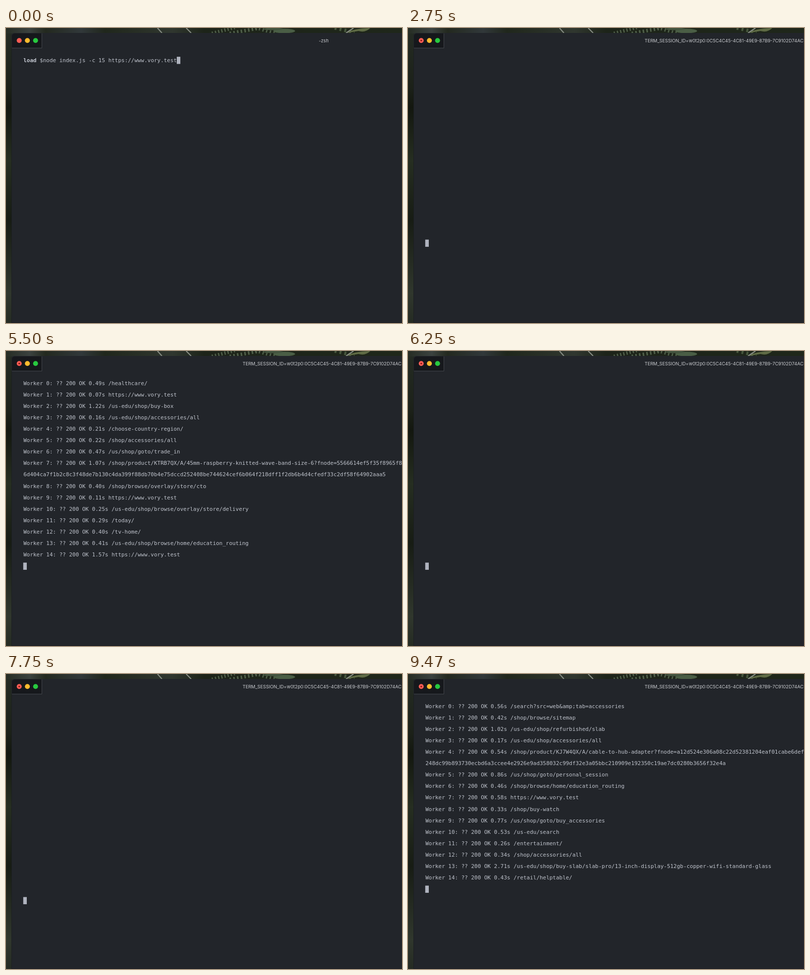
These frames come from a looping animation (800x596 px, 9.94 s). An HTML page:

```html
<!DOCTYPE html>
<html lang="en">
<head>
<meta charset="utf-8">
<title>Load test terminal</title>
<style>
  html, body { margin: 0; width: 100%; height: 100%; overflow: hidden; background: #22252a; }
  #stage { position: relative; width: 800px; height: 596px; overflow: hidden; }
  svg, pre, .title { position: absolute; }
  svg { left: 0; top: 0; }
  pre {
    left: 35.2px; top: 53.7px; margin: 0; color: #bfc3cc;
    font: 10.96px/23.09px "DejaVu Sans Mono", monospace;
  }
  pre b { color: #c6cad3; }
  .title { top: 18px; color: #c9cbcf; font: 9.2px/15px Inter, sans-serif; white-space: nowrap; }
  #idleTitle { left: 632px; }
  #busyTitle { left: 478px; }
</style>
</head>
<body>
<div id="stage">
  <svg width="800" height="596">
    <defs>
      <linearGradient id="foliage" x2="0" y2="1">
        <stop offset="0" stop-color="#252c24"/>
        <stop offset=".2" stop-color="#1c2119"/>
        <stop offset=".27" stop-color="#13170f"/>
        <stop offset=".45" stop-color="#262e21"/>
        <stop offset=".65" stop-color="#171c14"/>
        <stop offset=".9" stop-color="#30372d"/>
        <stop offset="1" stop-color="#252b23"/>
      </linearGradient>
      <linearGradient id="canopy">
        <stop offset="0" stop-color="#262d24"/>
        <stop offset=".06" stop-color="#3b423f"/>
        <stop offset=".1" stop-color="#23291f"/>
        <stop offset=".19" stop-color="#31383a"/>
        <stop offset=".25" stop-color="#20271c"/>
        <stop offset=".42" stop-color="#30372f"/>
        <stop offset=".5" stop-color="#1d2419"/>
        <stop offset="1" stop-color="#1f271a"/>
      </linearGradient>
    </defs>
    <rect width="800" height="596" fill="url(#foliage)"/>
    <rect width="800" height="11" fill="url(#canopy)"/>
    <g fill="none" stroke="#50604a" stroke-width="7">
      <path d="M416 11L462 -1" stroke-dasharray="2.5 4"/>
      <path d="M452 11L512 0" stroke-dasharray="3 4.5"/>
      <path d="M504 -1L544 11" stroke-dasharray="2.5 5"/>
      <path d="M664 0L704 9" stroke="#46563d" stroke-dasharray="4 6"/>
    </g>
    <ellipse cx="562" cy="6" rx="22" ry="4.5" fill="#4a5e45"/>
    <ellipse cx="540" cy="2" rx="20" ry="2.5" fill="#43543f"/>
    <path d="M688 10Q700 1 736 0Q726 10 712 6Z" fill="#5f6b45"/>
    <path d="M306 0l9 10M364 0l10 10M702 0l-15 10" stroke="#858b82" stroke-width="2.2"/>
    <path d="M11 596V16q0-6 6-6H800V596z" fill="#22252a"/>
    <path d="M12 40V17q0-6 6-6H72V40z" fill="#16181c"/>
    <path d="M12 40.5H72.5V11" fill="none" stroke="#43464b"/>
    <path d="M11.5 41V596" stroke="#1b1e21"/>
    <path d="M11 595.5H800" stroke="#191b1f"/>
    <circle cx="26.7" cy="25.3" r="5" fill="#fe5d55"/>
    <circle id="busyMark" cx="26.7" cy="25.3" r="1.6" fill="#80140f"/>
    <circle cx="43.2" cy="25.3" r="5" fill="#febb2e"/>
    <circle cx="59.7" cy="25.3" r="5" fill="#27c83f"/>
    <rect id="cursor" width="7.2" height="14.5" fill="#afb3be"/>
  </svg>
  <div class="title" id="idleTitle">-zsh</div>
  <div class="title" id="busyTitle">TERM_SESSION_ID=w0t2p0:0C5C4C45-4C81-49E9-87B9-7C9102D74AC</div>
  <pre id="prompt"><b>load</b> $node index.js -c 15 https://www.vory.test</pre>
  <pre id="output"></pre>
</div>
<script>
const LOOP = 9940, TICK = 250, ROW = 23.09, CHAR = 6.6;
const RUN = 1250, CLEAR = 1500, FIRST = 1750, LAST = 9470;
const site = 'https://www.vory.test';

// One batch: a line per worker; a newline inside a line is a terminal wrap.
const batch = (start, ...results) => ({
  start,
  text: results.map((r, i) =>
    `Worker ${i}: ?? ${r.startsWith('404') ? '' : '200 OK '}${r}`).join('\n')
});

const missing = '404 Not Found undefined QueryError: Request failed with status code 404';

const batches = [
  batch(FIRST,
    `0.42s ${site}`, `0.40s ${site}`, `0.43s ${site}`, `0.41s ${site}`, `0.44s ${site}`,
    `0.40s ${site}`, `0.45s ${site}`, `0.42s ${site}`, `0.41s ${site}`, `0.43s ${site}`,
    `0.44s ${site}`, `0.42s ${site}`, '0.46s /us-edu/shop/accessories/all',
    '0.52s /us-edu/shop/browse/overlay/store/delivery/times',
    '0.58s /us-edu/shop/browse/home/education_routing/store/pickup'),
  batch(2750,
    `0.09s ${site}`, '0.31s /shop/browse/sitemap/', '0.47s /us-edu/shop/refurbished/slab',
    '1.12s /shop/product/KDWF5QX/A/40mm-midnight-knitted-wave-band-size-4?fnode=7c3f48de7b130c4da399f88db\n' +
      '70b4e75dccd252408be744624cef6b064f218dff1f2db6b4d4cfedf33c2df58f64902aaa56d404ca7f1b2c8c3f48de7b130c4da399f',
    '0.22s /shop/accessories/all', '0.24s /shop/accessories/all', '0.38s /us/shop/goto/trade',
    `0.12s ${site}`, '0.26s /wallet/', '0.33s /entertainment', '0.29s /shop/goto/stores',
    '0.41s /us-edu/shop/browse/overlay/cto', '0.25s /education/k12/how-to-buy/',
    '0.61s /us-edu/shop/browse/home/education_routing', '0.27s /entertainment/'),
  batch(4500,
    '0.49s /healthcare/', `0.07s ${site}`, '1.22s /us-edu/shop/buy-box',
    '0.16s /us-edu/shop/accessories/all', '0.21s /choose-country-region/',
    '0.22s /shop/accessories/all', '0.47s /us/shop/goto/trade_in',
    '1.07s /shop/product/KTRB7QX/A/45mm-raspberry-knitted-wave-band-size-6?fnode=5566614ef5f35f8965f8\n' +
      '6d404ca7f1b2c8c3f48de7b130c4da399f88db70b4e75dccd252408be744624cef6b064f218dff1f2db6b4d4cfedf33c2df58f64902aaa5',
    '0.40s /shop/browse/overlay/store/cto', `0.11s ${site}`,
    '0.25s /us-edu/shop/browse/overlay/store/delivery', '0.29s /today/', '0.40s /tv-home/',
    '0.41s /us-edu/shop/browse/home/education_routing', `1.57s ${site}`),
  batch(6500,
    '0.55s /shop/product/KVHN8RT/A/velmo-garden-pips-true-wireless-noise-cancelling-earbuds-transpare\n' +
      'a569454f60d54059ef8b2b303b3519da8869ead4835cae11248dc99b893730ecbd6a3ccee4e2926e9ad358032c99df32e3a05bbc210909e19235',
    '0.27s /education/k12/how-to-buy/', '1.02s /us-edu/shop/refurbished/slab',
    '0.54s /us-edu/shop/product/KXPD4RT/A/velmo-bend-all-day-wireless-earphones-ember-blue?fnode=a2d4\n' +
      'c0ec75428d876c843a508108e764ef451315ca843fdf1bc84c32123814c23e115116f555ec54b2c9b0dacc1302101dc4b7567c3a6d15120e372f',
    missing, '0.23s /wallet/', '0.24s /shop/accessories/all', '0.04s /shop/accessories/all',
    `0.08s ${site}`, '0.31s /shop/open/salespolicies',
    '0.61s /us-edu/shop/browse/home/education_routing', '0.26s /entertainment/',
    '0.90s /entertainment/', '3.00s /us-edu/shop/buy-slab/slab-pro',
    '0.31s /legal/internet-services/melody/giftcards/'),
  batch(8250,
    '0.32s /shop/accessories/all', `0.09s ${site}`, '0.44s /us-edu/shop/buy-box',
    '0.35s /us-edu/shop/refurbished/slab', '0.28s /choose-country-region/',
    '0.51s /us/shop/goto/trade_in', missing, '0.30s /shop/browse/sitemap',
    '0.24s /shop/open/salespolicies', `0.10s ${site}`,
    '0.46s /us-edu/shop/browse/overlay/store/deliver',
    '0.57s /us-edu/shop/browse/home/education_routin', '0.33s /entertainment/',
    '0.39s /healthcare/', '0.62s /us-edu/shop/browse/overlay/store/pickup'),
  batch(9000,
    '0.56s /search?src=web&amp;tab=accessories', '0.42s /shop/browse/sitemap',
    '1.02s /us-edu/shop/refurbished/slab', '0.17s /us-edu/shop/accessories/all',
    '0.54s /shop/product/KJ7W4QX/A/cable-to-hub-adapter?fnode=a12d524e306a08c22d52381204eaf01cabe6def\n' +
      '248dc99b893730ecbd6a3ccee4e2926e9ad358032c99df32e3a05bbc210909e192350c19ae7dc0280b3656f32e4a',
    '0.86s /us/shop/goto/personal_session', '0.46s /shop/browse/home/education_routing',
    `0.58s ${site}`, '0.33s /shop/buy-watch', '0.77s /us/shop/goto/buy_accessories',
    '0.53s /us-edu/search', '0.26s /entertainment/', '0.34s /shop/accessories/all',
    '2.71s /us-edu/shop/buy-slab/slab-pro/13-inch-display-512gb-copper-wifi-standard-glass',
    '0.43s /retail/helptable/')
];

// The output blinks on every tick except these.
const steadyTicks = [2500, 8250, 8500, 9000, 9250];
function outputLit(t) {
  const flips = Math.floor((t - FIRST) / TICK) - steadyTicks.filter(s => s <= t).length;
  return t >= LAST || flips % 2 === 0;
}

const $ = id => document.getElementById(id);
const show = (id, on) => { $(id).style.visibility = on ? 'visible' : 'hidden'; };

function placeCursor(col, row) {
  $('cursor').setAttribute('x', 34.8 + col * CHAR);
  $('cursor').setAttribute('y', 58.1 + row * ROW);
}

function draw(t) {
  const busy = t >= RUN;
  const current = batches.filter(b => b.start <= t).pop();
  show('idleTitle', !busy);
  show('busyTitle', busy);
  show('busyMark', busy);
  show('prompt', t < CLEAR);
  show('cursor', t < 750 || t >= 1000);
  show('output', current && outputLit(t));
  if (current) {
    if ($('output').textContent !== current.text) $('output').textContent = current.text;
    placeCursor(0, current.text.split('\n').length);
  } else if (busy) {
    placeCursor(0, t < CLEAR ? 1 : 0);
  } else {
    placeCursor(47, 0);
  }
}

const began = performance.now();
function frame() {
  draw((performance.now() - began) % LOOP);
  requestAnimationFrame(frame);
}
frame();
</script>
</body>
</html>
```
